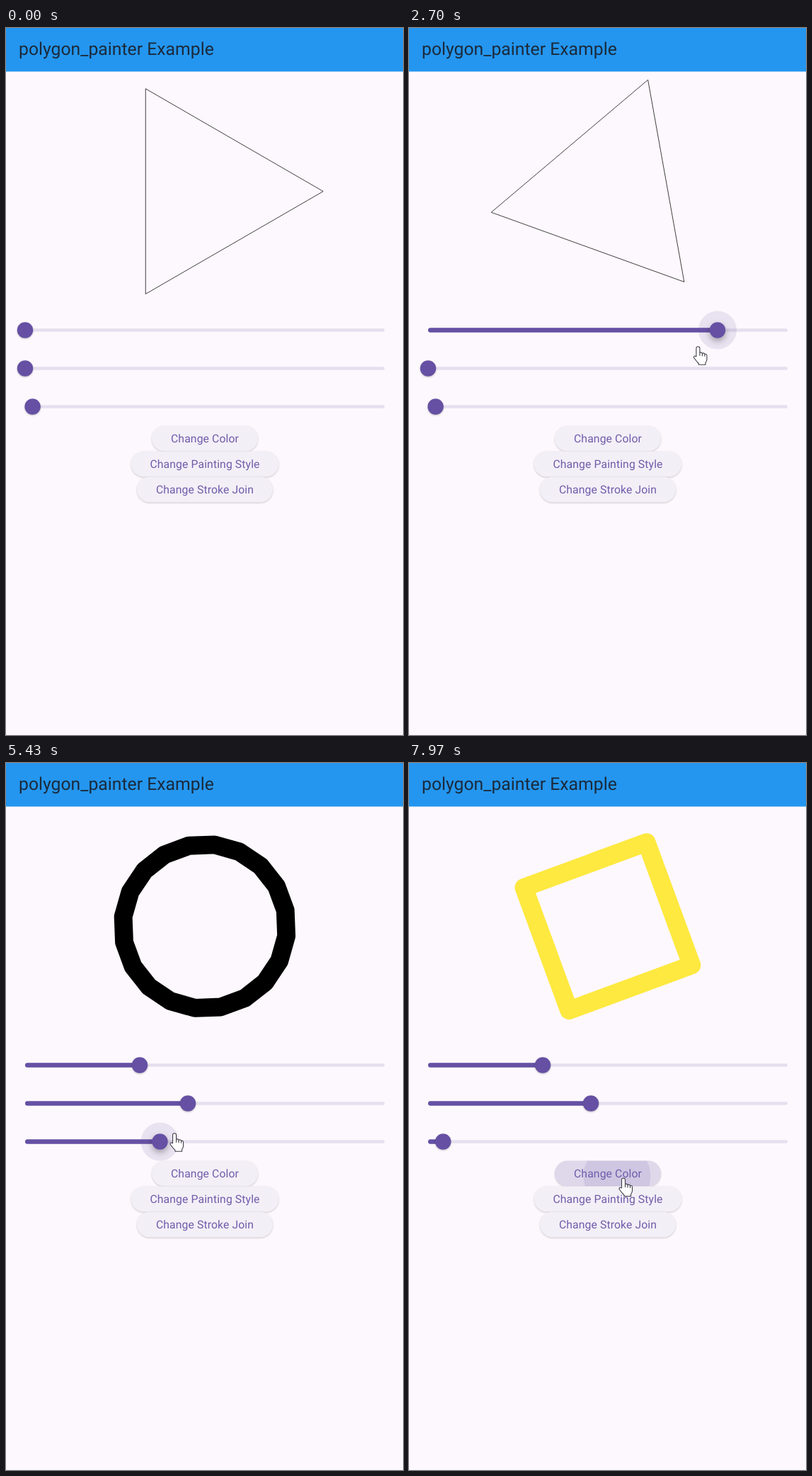
These frames come from a looping animation (561 by 998 pixels, 8 s). An HTML page:

```html
<!DOCTYPE html>
<html lang="en">
<head>
<meta charset="utf-8">
<title>polygon_painter Example</title>
<style>
  html, body { margin: 0; width: 100%; height: 100%; overflow: hidden; background: #fdf8fd; }
  svg { display: block; width: 100%; height: 100%; }
  text { font-family: Roboto, sans-serif; text-rendering: geometricPrecision; }
  .label { font-size: 15.75px; letter-spacing: .11px; fill: #705caa; text-anchor: middle; }
  .button { fill: #f3eff7; filter: drop-shadow(0 1px 1px rgba(0, 0, 0, .2)); }
  .thumb { fill: #6550a4; filter: drop-shadow(0 1px 1px rgba(0, 0, 0, .25)); }
  .thumb.held { filter: drop-shadow(0 4px 4px rgba(0, 0, 0, .3)); }
</style>
</head>
<body>
<svg viewBox="0 0 561 998">
  <clipPath id="pill"><rect x="206" y="561.5" width="150" height="36" rx="18"/></clipPath>
  <rect width="561" height="998" fill="#fdf8fd"/>
  <rect width="561" height="61.5" fill="#2496ef"/>
  <text x="18" y="38.4" font-size="24.75" fill="#1b2a3c">polygon_painter Example</text>
  <path id="polygon" fill="none" stroke-linejoin="round"/>
  <g id="sliders"></g>
  <g id="buttons"></g>
  <g id="cursor" fill="#fff" stroke="#3f3b45" stroke-width="1.1" stroke-linejoin="round">
    <path d="M-2.5 14V2.5Q-2.5 0 0 0Q2.5 0 2.5 2.5V8.5Q5 7.5 6 9.5Q8.5 8.5 9.5 10.5Q12.5 10 12.5 13V18Q12.5 20 10.5 23V25.5H1V24Q-2 21 -6 15.5Q-6 12 -2.5 14Z"/>
    <path fill="none" d="M2.5 8.5V13M6 9.5V13.5M9.5 10.5V14"/>
  </g>
</svg>
<script>
const LOOP = 8000, SCALE = 1.125, LAG = 25;
const LEFT = 27, LENGTH = 508, STEPS = 48;
const PRESS = 7840, RECOLOR = 7920;
const $ = id => document.getElementById(id);
const clamp = (v, lo = 0, hi = 1) => Math.min(hi, Math.max(lo, v));

// The hand glides from stop to stop; each glide starts at `leave` and ends at `arrive`
const stops = [
  { arrive: 0, leave: 250, x: -20, y: 440 },
  { arrive: 950, leave: 1570, x: 27, y: 425 },
  { arrive: 2594, leave: 2594, x: 482, y: 447 },
  { arrive: 2921, leave: 3000, x: 189, y: 458 },
  { arrive: 3330, leave: 3400, x: 27, y: 482 },
  { arrive: 4150, leave: 4380, x: 257, y: 485 },
  { arrive: 4900, leave: 4975, x: 38, y: 533 },
  { arrive: 5840, leave: 5840, x: 408, y: 514 },
  { arrive: 6550, leave: 6600, x: 27, y: 508 },
  { arrive: 6850, leave: 6980, x: 50.5, y: 508 },
  { arrive: 7450, leave: 7500, x: 292, y: 646 },
  { arrive: 7780, leave: LOOP, x: 303, y: 586 }
];

// A slider follows the hand from grab to release
const sliders = [
  { y: 426.5, grab: 950, release: 3000 },
  { y: 480.5, grab: 3330, release: 4380 },
  { y: 534.5, grab: 4900, release: 6980, stepped: true }
];

const buttons = [
  { label: "Change Color", width: 150 },
  { label: "Change Painting Style", width: 208.5 },
  { label: "Change Stroke Join", width: 192 }
].map((b, i) => ({ ...b, x: 281 - b.width / 2, y: 561.5 + 36 * i }));

function handAt(t) {
  const i = Math.max(1, stops.findIndex(s => s.leave >= t));
  const from = stops[i - 1], to = stops[i];
  const u = clamp((t - from.leave) / (to.arrive - from.leave));
  const eased = u * u * (3 - 2 * u);
  return { x: from.x + (to.x - from.x) * eased, y: from.y + (to.y - from.y) * eased };
}

function build() {
  $("sliders").innerHTML = sliders.map(({ y }) => `<g>
    <rect x="${LEFT}" y="${y - 2.25}" width="${LENGTH}" height="4.5" rx="2.25" fill="#e6dfef"/>
    <rect class="active" x="${LEFT}" y="${y - 3.2}" height="6.4" rx="3.2" fill="#6550a4"/>
    <circle class="halo" cy="${y}" fill="#644d9b" fill-opacity=".13"/>
    <circle class="thumb" cy="${y}" r="11.2"/></g>`).join("");
  $("buttons").innerHTML = buttons.map(({ label, x, y, width }, i) => {
    const box = `x="${x}" y="${y}" width="${width}" height="36" rx="18"`;
    return `<rect class="button" ${box}/><rect class="tint" ${box} fill="#6750a4"/>
      ${i ? "" : '<circle id="ripple" fill="#6750a4" clip-path="url(#pill)"/>'}
      <text class="label" x="281" y="${y + 23.4}">${label}</text>`;
  }).join("");
}

function drawSlider({ grab, release, stepped }, group, t) {
  let value = clamp((handAt(clamp(t - LAG, grab, release)).x - LEFT) / LENGTH);
  if (stepped) value = Math.round(value * STEPS) / STEPS;
  const x = LEFT + value * LENGTH;
  const glow = clamp((t - grab) / 100) * clamp((release + 100 - t) / 100);
  const halo = group.querySelector(".halo"), thumb = group.querySelector(".thumb");
  group.querySelector(".active").setAttribute("width", x - LEFT);
  halo.setAttribute("cx", x);
  halo.setAttribute("r", 27 * glow);
  thumb.setAttribute("cx", x);
  thumb.classList.toggle("held", glow > .5);
  return value;
}

function drawPolygon(turn, weight, sideValue, t) {
  const sides = Math.max(3, Math.round(sideValue * STEPS) + 2);
  const stroke = SCALE * (.67 + 49.3 * weight);
  const c = Math.cos(Math.PI / sides);
  // The mitred outer edge stays put, so thicker strokes pull the path inwards
  const radius = (252.1 + 9.5 * (c - .5)) / (1 + c) - stroke / 2 / c;
  const points = Array.from({ length: sides }, (_, i) => {
    const angle = 2 * Math.PI * (turn + i / sides);
    return `${280.9 + radius * Math.cos(angle)} ${230.6 + radius * Math.sin(angle)}`;
  });
  $("polygon").setAttribute("d", `M${points.join("L")}Z`);
  $("polygon").setAttribute("stroke-width", stroke);
  $("polygon").setAttribute("stroke", t < RECOLOR ? "#000" : "#fde93f");
}

function drawButtons({ x, y }, t) {
  document.querySelectorAll(".tint").forEach((tint, i) => {
    const b = buttons[i];
    const over = x > b.x && x < b.x + b.width && y > b.y && y < b.y + 36;
    tint.setAttribute("opacity", !over ? 0 : t > PRESS ? .14 : .07);
  });
  const grow = clamp((t - PRESS) / 290), ripple = $("ripple");
  ripple.setAttribute("cx", 303 - 20 * grow);
  ripple.setAttribute("cy", 586 - 6 * grow);
  ripple.setAttribute("r", t < PRESS ? 0 : 23 + 54 * grow);
  ripple.setAttribute("opacity", .13 * clamp((t - PRESS) / 75));
}

function draw(t) {
  const groups = $("sliders").children, hand = handAt(t);
  const [turn, weight, sideValue] = sliders.map((s, i) => drawSlider(s, groups[i], t));
  drawPolygon(turn, weight, sideValue, t);
  drawButtons(hand, t);
  $("cursor").setAttribute("transform", `translate(${hand.x} ${hand.y})`);
}

build();
const start = performance.now();
function tick() {
  draw((performance.now() - start) % LOOP);
  requestAnimationFrame(tick);
}
tick();
</script>
</body>
</html>
```
